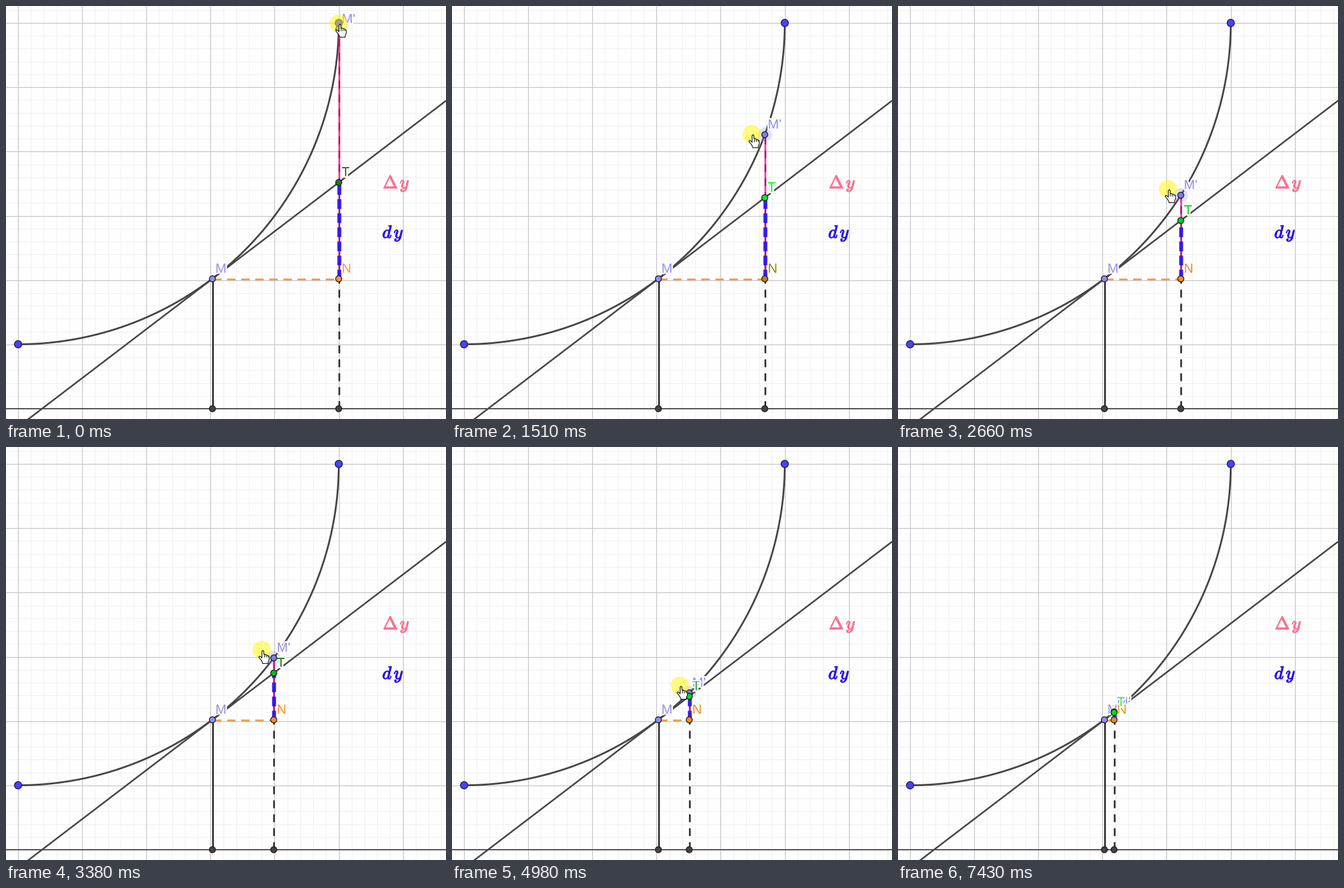
Animation of 728x682 px, one loop 7710 ms. Source, as a matplotlib script:

```python
import matplotlib.pyplot as plt
import numpy as np
from matplotlib.animation import FuncAnimation
from matplotlib.collections import LineCollection
from matplotlib.patches import Circle, Polygon
from matplotlib.patheffects import withStroke

W, H, DPI = 728, 682, 64
PT = 72 / DPI               # points per pixel
LOOP, INTERVAL = 7710, 30

CX, CY, R = 20, 28, 530.6   # the arc is a quarter circle
MX, MY = 341.5, 450.5
AXIS = 665
SLOPE = -(MX - CX) / (MY - CY)
INK = "#464646"

plt.rcParams["lines.scale_dashes"] = False
plt.rcParams["mathtext.fontset"] = "cm"

# Moments at which the picture changes
STEPS = np.concatenate([[0]] + [np.linspace(*s) for s in (
    (80, 800, 11), (880, 1590, 11), (1660, 2360, 11), (2440, 3160, 10),
    (3230, 3950, 11), (4020, 4770, 11), (4830, 5550, 11), (5630, 6360, 11),
    (6920, 7430, 8))])

# time, x of the dragged point, pointer x, pointer y
DRAG = np.array([
    (0, 550.5, 550.5, 29), (800, 546, 529, 92), (1519, 517.5, 496, 211.5),
    (1590, 512.5, 491, 221), (2080, 488, 468.5, 270), (2360, 476, 454, 292),
    (3160, 447.5, 430, 326), (3374, 443, 423, 335), (3950, 426, 410, 355),
    (4770, 397, 382, 388), (4974, 392.5, 377, 394), (5550, 382, 367, 405),
    (6068, 362, 352, 421), (6360, 357.5, 349, 427)])
ANGLES = np.arccos(np.clip((DRAG[:, 1] - CX) / R, -1, 1))
LEAVE = np.array([(6360, 349, 427), (6850, 349, 427), (6993, 385, 456),
                  (7139, 500, 545), (7357, 675, 672)])
GONE = 7430

# start, T point, T label, N point, N label
TINTS = [
    (0, "#1a7d1a", "#237a23", "#f7964a", "#f7964a"),
    (880, "#00ee22", "#00ff1e", "#c07a30", "#8a8a0a"),
    (1660, "#00d21e", "#14d21e", "#ff8c1e", "#f78c1e"),
    (3230, "#00be0a", "#1a7d1a", "#ff8c1e", "#ff8c28"),
    (4830, "#0adc1e", "#28aa32", "#ff8c0a", "#f58c14"),
    (5630, "#00d21e", "#0ad21e", "#ff8c1e", "#ff8c28"),
    (7430, "#00dc14", "#46f046", "#e68c1e", "#e6961e"),
]

fig = plt.figure(figsize=(W / DPI, H / DPI), dpi=DPI, facecolor="#fefefe")
ax = fig.add_axes([0, 0, 1, 1])
ax.set(xlim=(0, W), ylim=(H, 0))
ax.axis("off")


def line(xs, ys, color, width, z, dash=None, alpha=1):
    style = (0, [d * PT for d in dash]) if dash else "-"
    art, = ax.plot(xs, ys, color=color, lw=width * PT, ls=style, zorder=z,
                   alpha=alpha, solid_capstyle="butt")
    return art


def point(x, y, color, z, r=5, edge="#202020"):
    return ax.add_patch(Circle((x, y), r, fc=color, ec=edge, lw=1.4 * PT,
                               zorder=z))


def label(text, color, z):
    halo = withStroke(linewidth=5 * PT, foreground="white")
    return ax.text(0, 0, text, color=color, fontsize=22 * PT, zorder=z,
                   family="Liberation Sans", va="baseline",
                   path_effects=[halo])


def formula(x, y, text, color):
    bold = withStroke(linewidth=1.3 * PT, foreground=color)
    ax.text(x, y, f"${text}$", color=color, fontsize=29.5 * PT, zorder=5,
            va="baseline", path_effects=[bold])


def put(text, x, y):
    text.set_position((x + 5, y - 10))


def grid(dx, dy, color, width):
    xs = np.arange(CX % dx, W, dx)
    ys = np.arange(CY % dy, H, dy)
    rows = [[(x, 0), (x, H)] for x in xs] + [[(0, y), (W, y)] for y in ys]
    ax.add_collection(LineCollection(rows, colors=color, lw=width * PT,
                                     zorder=1))


# Fixed parts
grid(106.1 / 5, 106.17 / 5, "#efefef", 1)
grid(106.1, 106.17, "#c2c2c2", 1.2)
line([0, W], [AXIS, AXIS], "#202020", 1.5, 2)

arc = np.linspace(0, np.pi / 2, 120)
line(CX + R * np.cos(arc), CY + R * np.sin(arc), INK, 3, 3)
line([0, W], [MY + SLOPE * (x - MX) for x in (0, W)], INK, 2.7, 3)
line([MX, MX], [MY, AXIS], "#3a3a3a", 3, 3)

point(CX, CY + R, "#4a42f5", 10, 6, "#1c1c50")
point(CX + R, CY, "#4a42f5", 10, 6, "#1c1c50")
point(MX, MY, "#938ff0", 11)
point(MX, AXIS, "#404444", 10)

formula(623.5, 301, r"\Delta", "#ff6f8f")
formula(651.5, 301, "y", "#ff6f8f")
formula(622.5, 383, "d", "#2a14e8")
formula(641.5, 383, "y", "#2a14e8")

# Moving parts
run = line([], [], "#f79c50", 3, 4, (14, 9.3))
drop = line([], [], "#3c3c3c", 3, 4, (13, 10))
rise = line([], [], "#e6148c", 3.2, 5, alpha=0.75)
part = line([], [], "#2a12f0", 6.5, 6, (16, 7.3), alpha=0.92)

glow = ax.add_patch(Circle((0, 0), 11.5, fc="#8c8cd8", alpha=0.25, lw=0,
                           zorder=4.5))
dot_p = point(0, 0, "#7d7af0", 12)
dot_t = point(0, 0, "#00d21e", 13)
dot_n = point(0, 0, "#ff8c1e", 14)
foot = point(0, AXIS, "#404444", 10)

text_m = label("M", "#9490ea", 7)
put(text_m, MX, MY)
text_p = label("M'", "#8f8cee", 7.1)
text_n = label("N", "#ff8c1e", 7.2)
text_t = label("T", "#00d21e", 7.3)

spot = ax.add_patch(Circle((0, 0), 15, fc="#fffa08", alpha=0.52, lw=0,
                           zorder=20))
HAND = np.array([
    (5, 1.5), (6.5, 0), (8, 1.5), (8, 6), (10.5, 6.5), (11, 7.5),
    (13.5, 7.5), (14, 8.5), (16, 9), (17, 10.5), (17, 15), (15.5, 18),
    (15, 21.5), (6, 21.5), (5.5, 19), (3, 15), (0, 11.5), (0, 10),
    (1.5, 9.5), (3, 10.5), (5, 12.5)]) + (-4.5, 1)
KNUCKLES = np.array([
    (8, 6), (8, 11), (np.nan, 0), (11, 7.5), (11, 11), (np.nan, 0),
    (14, 8.5), (14, 11)]) + (-4.5, 1)
hand = ax.add_patch(Polygon(HAND, fc="white", ec="#101010", lw=1.2 * PT,
                            joinstyle="round", zorder=21))
knuckles = line([], [], "#101010", 1.1, 22)


def place_pointer(t):
    if t <= 6360:
        x, y = (np.interp(t, DRAG[:, 0], DRAG[:, k]) for k in (2, 3))
    else:
        x, y = (np.interp(t, LEAVE[:, 0], LEAVE[:, k]) for k in (1, 2))
    for art in (spot, hand, knuckles):
        art.set_visible(t < GONE)
    spot.center = x, y
    hand.set_xy(HAND + (x, y))
    knuckles.set_data(*(KNUCKLES + (x, y)).T)
    # the highlight swallows the label of M when it sits on it
    covered = t < GONE and np.hypot(x - 355, y - 425) < 12
    text_m.set_visible(not covered)


def draw(frame):
    now = frame * INTERVAL + 20
    t = STEPS[np.searchsorted(STEPS, now, side="right") - 1]

    a = np.interp(t, DRAG[:, 0], ANGLES)
    x, y = CX + R * np.cos(a), CY + R * np.sin(a)
    ty = MY + SLOPE * (x - MX)

    run.set_data([MX, x], [MY, MY])
    drop.set_data([x, x], [AXIS, y])
    rise.set_data([x, x], [MY, y])
    part.set_data([x, x], [MY, ty])

    glow.center = dot_p.center = x, y
    glow.set_visible(t > 0)
    dot_t.center = x, ty
    dot_n.center = x, MY
    foot.center = x, AXIS
    put(text_p, x, y)
    put(text_t, x, ty)
    put(text_n, x, MY)

    tints = [row[1:] for row in TINTS if row[0] <= t][-1]
    dot_t.set_facecolor(tints[0])
    text_t.set_color(tints[1])
    dot_n.set_facecolor(tints[2])
    text_n.set_color(tints[3])

    place_pointer(t)
    return []


anim = FuncAnimation(fig, draw, frames=LOOP // INTERVAL, interval=INTERVAL,
                     repeat=True, repeat_delay=0)
plt.show()
```
